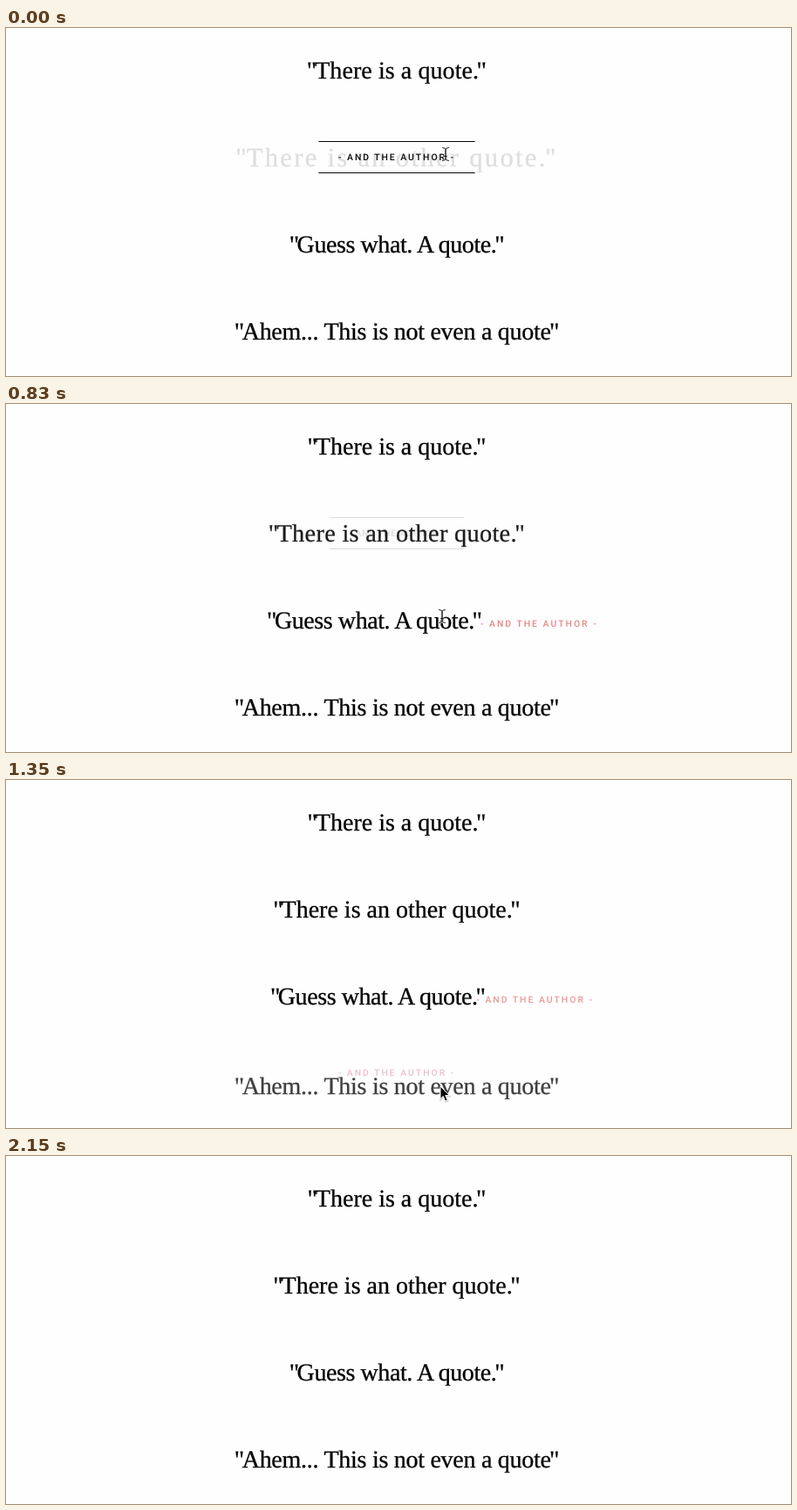
An HTML page for the animation above (4.33 s loop, 900 by 400 pixels).

```html
<!DOCTYPE html>
<html lang="en">
<head>
<meta charset="utf-8">
<title>Quote hovers</title>
<style>
  html, body { margin: 0; width: 100%; height: 100%; overflow: hidden; background: #fefefe; }
  svg { display: block; width: 900px; height: 400px; }
  text { text-anchor: middle; text-rendering: geometricPrecision; }
  .quote { font: 28px "Playfair Display", "Liberation Serif", "Times New Roman", serif; stroke: #000; stroke-width: .3px; }
  .author { font: 500 10.4px Roboto, "Open Sans", sans-serif; }
</style>
</head>
<body>
<svg viewBox="0 0 900 400">
  <text id="q1" class="quote" x="448" y="58">"<tspan dx="-2.2">There is a quote.</tspan><tspan dx="-2.5">"</tspan></text>
  <text id="q2" class="quote" x="448" y="158">"<tspan dx="-2.2">There is an other quote.</tspan><tspan dx="-2.5">"</tspan></text>
  <text id="q3" class="quote" x="448" y="258" letter-spacing="-.42">"<tspan dx="-2.2">Guess what. A quote.</tspan><tspan dx="-2.2">"</tspan></text>
  <text id="q4" class="quote" x="448" y="358" letter-spacing="-.27">"<tspan dx="-2.2">Ahem... This is not even a quote</tspan><tspan dx="-1.6">"</tspan></text>

  <g id="a2">
    <rect class="rule" y="130" height="1"/>
    <rect class="rule" y="166" height="1"/>
    <text id="label" class="author" x="448" y="152.3">- AND THE AUTHOR -</text>
  </g>
  <text id="a3" class="author" x="616.5" y="256" letter-spacing="2" fill="#e57370">- AND THE AUTHOR -</text>
  <text id="a4" class="author" x="448" y="354.5" letter-spacing="2" fill="#c2185b">- AND THE AUTHOR -</text>

  <g id="beam" fill="none" stroke-linecap="round">
    <path d="M-3.5 -7.5Q0 -7.5 0 -5V5Q0 7.5 -3.5 7.5M3.5 -7.5Q0 -7.5 0 -5V5Q0 7.5 3.5 7.5M-1.5 2.5H1.5" stroke="#fff" stroke-width="2.4" stroke-opacity=".7"/>
    <path d="M-3.5 -7.5Q0 -7.5 0 -5V5Q0 7.5 -3.5 7.5M3.5 -7.5Q0 -7.5 0 -5V5Q0 7.5 3.5 7.5M-1.5 2.5H1.5" stroke="#222" stroke-width="1"/>
  </g>
  <g id="arrow">
    <path d="M0 0V14.5L3.3 11.4L5.6 17L8.2 15.9L5.8 10.5H10.3Z" transform="translate(.3 1)" fill="#000" opacity=".16" stroke="#000" stroke-width="2"/>
    <path d="M0 0V14.5L3.3 11.4L5.6 17L8.2 15.9L5.8 10.5H10.3Z" fill="#000" stroke="#fff" stroke-width="1"/>
  </g>
</svg>
<script>
const LOOP = 4330, FADE = 300, CX = 448;
const steps = [0, 90, 300, 390, 470, 560, 650, 740, 830, 920, 1000, 1090,
  1180, 1270, 1350, 1440, 1530, 1620, 1790, 1880, 1970, 2060, 2150];

// time, x, y of the pointer
const path = [[0, 504, 145], [90, 504, 149], [300, 504, 160], [470, 503, 204],
  [650, 502, 225], [830, 500, 244], [1000, 500, 252], [1180, 499, 262],
  [1270, 498, 305], [1350, 498, 352], [1440, 497, 362], [1620, 497, 367]];
const pointerEnd = 1790;

const el = id => document.getElementById(id);
const rules = document.querySelectorAll('.rule');

// cubic-bezier(.25, .1, .25, 1)
function ease(x) {
  if (x <= 0) return 0;
  if (x >= 1) return 1;
  const curve = (s, a, b) => 3 * s * (1 - s) ** 2 * a + 3 * s * s * (1 - s) * b + s ** 3;
  let lo = 0, hi = 1;
  for (let i = 0; i < 24; i++) {
    const mid = (lo + hi) / 2;
    if (curve(mid, .25, .25) < x) lo = mid; else hi = mid;
  }
  return curve(lo, .1, 1);
}

const ramp = (t, start) => ease((t - start) / FADE);
const hover = (t, from, to) => ramp(t, from) - ramp(t, to);

function put(id, opacity, transform) {
  el(id).setAttribute('opacity', opacity);
  el(id).setAttribute('transform', transform);
}

function spread(id, cy, p) {
  const k = 1 + .1 * p;
  put(id, 1 - .9 * p, `translate(${CX} ${cy}) scale(${k}) translate(${-CX} ${-cy})`);
  el(id).setAttribute('letter-spacing', 2.1 * p);
}

function drawPointer(t) {
  let i = 0;
  while (i < path.length - 2 && path[i + 1][0] <= t) i++;
  const [t0, x0, y0] = path[i], [t1, x1, y1] = path[i + 1];
  const k = Math.min(1, (t - t0) / (t1 - t0));
  const at = `translate(${x0 + (x1 - x0) * k} ${y0 + (y1 - y0) * k})`;
  const y = y0 + (y1 - y0) * k;
  const shown = t < pointerEnd ? 1 : 0;
  const onText = y < 168 || (y > 232 && y < 268);
  put('beam', onText ? shown : 0, at);
  put('arrow', onText ? 0 : shown, at);
}

function draw(t) {
  const p1 = 1 - ramp(t, -240);
  const p2 = hover(t, -240, 657);
  const p3 = hover(t, 662, 1293);
  const p4 = hover(t, 1293, 1862);

  spread('q1', 49, p1);

  spread('q2', 149, p2);
  put('a2', p2, '');
  el('label').setAttribute('letter-spacing', .4 + 1.6 * p2);
  const w = 150 + 30 * p2;
  for (const r of rules) {
    r.setAttribute('x', CX - w / 2);
    r.setAttribute('width', w);
  }

  put('q3', 1, `translate(${-30 * p3} 0)`);
  put('a3', p3, `translate(${-36 * (1 - p3)} 0)`);

  put('q4', 1 - .9 * p4, `translate(0 ${10 * p4})`);
  put('a4', p4, `translate(0 ${-20 * (1 - p4)})`);

  drawPointer(t);
}

const begin = performance.now();
function tick() {
  const t = (performance.now() - begin) % LOOP;
  draw(steps.filter(s => s <= t).pop());
  requestAnimationFrame(tick);
}
draw(0);
requestAnimationFrame(tick);
</script>
</body>
</html>
```
